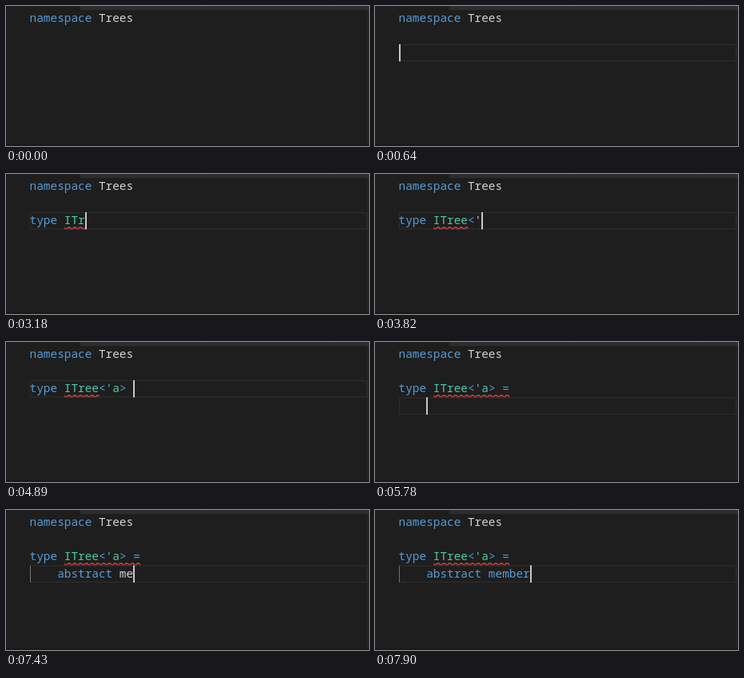
An HTML page that plays this animation: 454 by 176 pixels, repeating every 8000 ms.

```html
<!DOCTYPE html>
<html lang="en">
<head>
<meta charset="utf-8">
<title>Typing a type</title>
<style>
  html, body { margin: 0; width: 100%; height: 100%; overflow: hidden; background: #1e1e1e; }
  svg { display: block; width: 454px; height: 176px; }
  text { font: 500 14.4px "Noto Sans Mono", "Liberation Mono", monospace; white-space: pre; fill: #d4d4d4; }
  .key { fill: #569cd6; }
  .type { fill: #4ec9a8; }
</style>
</head>
<body>
<svg viewBox="0 0 454 176">
  <defs>
    <pattern id="wave" width="6" height="3" patternUnits="userSpaceOnUse" patternTransform="translate(30 66) scale(1.2)">
      <path fill="#ee4a45" d="M5.5 0 2.5 3H1.1L4.1 0ZM4 0 6 2V.6L5.4 0ZM0 2 1 3H2.4L0 .6Z"/>
    </pattern>
  </defs>
  <rect width="454" height="176" fill="#1e1e1e"/>
  <path fill="#2d2d2d" d="M93 0H454V5H93Z"/>
  <path fill="#232323" d="M244 0h1v5h-1ZM408 0h1v5h-1Z"/>
  <path fill="#191919" d="M0 174H454V176H0Z"/>
  <path fill="#262626" d="M452 5h1v169h-1Z"/>
  <rect id="current" x="30.5" width="421" height="20.4" fill="none" stroke="#2b2b2b" stroke-width="1.4"/>
  <rect id="guide" x="30" y="70" width="1" height="21" fill="#707070"/>
  <g id="waves"></g>
  <text x="29.6" y="20"><tspan class="key">namespace</tspan> Trees</text>
  <text id="upper" x="29.6" y="63"></text>
  <text id="lower" x="29.6" y="85"></text>
  <rect id="caret" width="2" height="21.6" fill="#c8c8c8"/>
</svg>
<script>
const LOOP = 8000, CHAR = 8.64, LEFT = 30, ROW = 21.6, TOP = 4.8;
const $ = id => document.getElementById(id);

const upper = [["type", "key"], [" ", ""], ["ITree", "type"], ["<", "key"], ["'a", "type"], [">", "key"], [" ", ""], ["= ", "key"]];
const lower = [["    ", ""], ["abstract", "key"], [" ", ""], ["member", "key"]];

// u, l: typed characters; uc, lc: coloured ones; uw, lw: underlined columns
const start = { row: 9, on: 1, u: 0, uc: 0, l: 0, lc: 0, uw: [0, 0], lw: [0, 0], guide: 0 };
const steps = [
  [180, { row: 8 }], [270, { row: 7 }], [360, { row: 6 }],
  [450, { row: 5 }], [550, { row: 4 }], [640, { row: 3 }],
  [1180, { on: 0 }], [1660, { on: 1 }],
  [1720, { u: 1 }], [1780, { u: 2 }], [1840, { uw: [0, 2] }], [1890, { u: 3 }],
  [2010, { u: 4, uc: 4, uw: [0, 0] }], [2180, { u: 5 }],
  [2650, { on: 0 }], [2770, { on: 1, u: 6 }],
  [2950, { u: 7 }], [3010, { uc: 7, uw: [5, 7] }], [3070, { u: 8 }], [3180, { uc: 8, uw: [5, 8] }],
  [3300, { u: 9, uc: 9 }], [3360, { uw: [5, 9] }], [3420, { u: 10, uc: 10 }],
  [3540, { uw: [5, 10] }], [3650, { u: 11 }], [3710, { uc: 11 }],
  [3770, { u: 12 }], [3890, { u: 13 }], [3950, { uc: 13 }], [4050, { u: 14 }], [4110, { uc: 14 }],
  [4530, { on: 0 }], [4890, { on: 1, u: 15 }], [4950, { u: 16, uc: 16 }],
  [5010, { uw: [5, 16] }], [5070, { u: 17 }],
  [5370, { row: 4 }], [5780, { l: 4 }],
  [6140, { l: 5, guide: 1 }], [6260, { l: 6 }], [6360, { l: 7, uw: [5, 5] }], [6460, { l: 8 }],
  [6560, { l: 9 }], [6660, { lw: [4, 9] }], [6760, { l: 10 }], [6840, { l: 11 }],
  [6960, { l: 12 }], [7070, { l: 13, lc: 12 }], [7170, { lw: [4, 4], uw: [5, 16] }], [7250, { l: 14 }],
  [7430, { l: 15 }], [7480, { l: 16 }],
  [7720, { l: 17 }], [7780, { l: 18 }], [7840, { l: 19 }], [7900, { lc: 19 }]
];

const states = [start];
for (const [, change] of steps) states.push({ ...states[states.length - 1], ...change });

function write(id, tokens, typed, coloured) {
  const spans = [];
  let at = 0;
  for (const [word, kind] of tokens) {
    const mid = Math.max(0, coloured - at), end = Math.max(0, typed - at);
    for (const [part, cls] of [[word.slice(0, Math.min(mid, end)), kind], [word.slice(mid, end), ""]]) {
      if (!part) continue;
      const span = document.createElementNS("http://www.w3.org/2000/svg", "tspan");
      span.textContent = part;
      if (cls) span.setAttribute("class", cls);
      spans.push(span);
    }
    at += word.length;
  }
  $(id).replaceChildren(...spans);
}

const wave = ([from, to], y) => to > from
  ? `<g transform="translate(${from * CHAR} ${y})"><rect x="${LEFT}" y="66" width="${(to - from) * CHAR}" height="3.6" fill="url(#wave)"/></g>`
  : "";

function draw(s) {
  const y = TOP + (s.row - 1) * ROW;
  const col = s.row === 3 ? s.u : s.row === 4 ? s.l : 0;
  write("upper", upper, s.u, s.uc);
  write("lower", lower, s.l, s.lc);
  $("waves").innerHTML = wave(s.uw, 0) + wave(s.lw, ROW);
  $("current").setAttribute("y", y + 0.6);
  $("guide").setAttribute("opacity", s.guide);
  $("caret").setAttribute("x", Math.floor(LEFT + 1.2 * Math.round(col * 7.2)));
  $("caret").setAttribute("y", y);
  $("caret").setAttribute("opacity", s.on);
}

let shown = -1;
const origin = performance.now();
function tick() {
  const t = (performance.now() - origin) % LOOP;
  const now = steps.filter(step => step[0] <= t).length;
  if (now !== shown) draw(states[shown = now]);
  requestAnimationFrame(tick);
}
tick();
</script>
</body>
</html>
```
